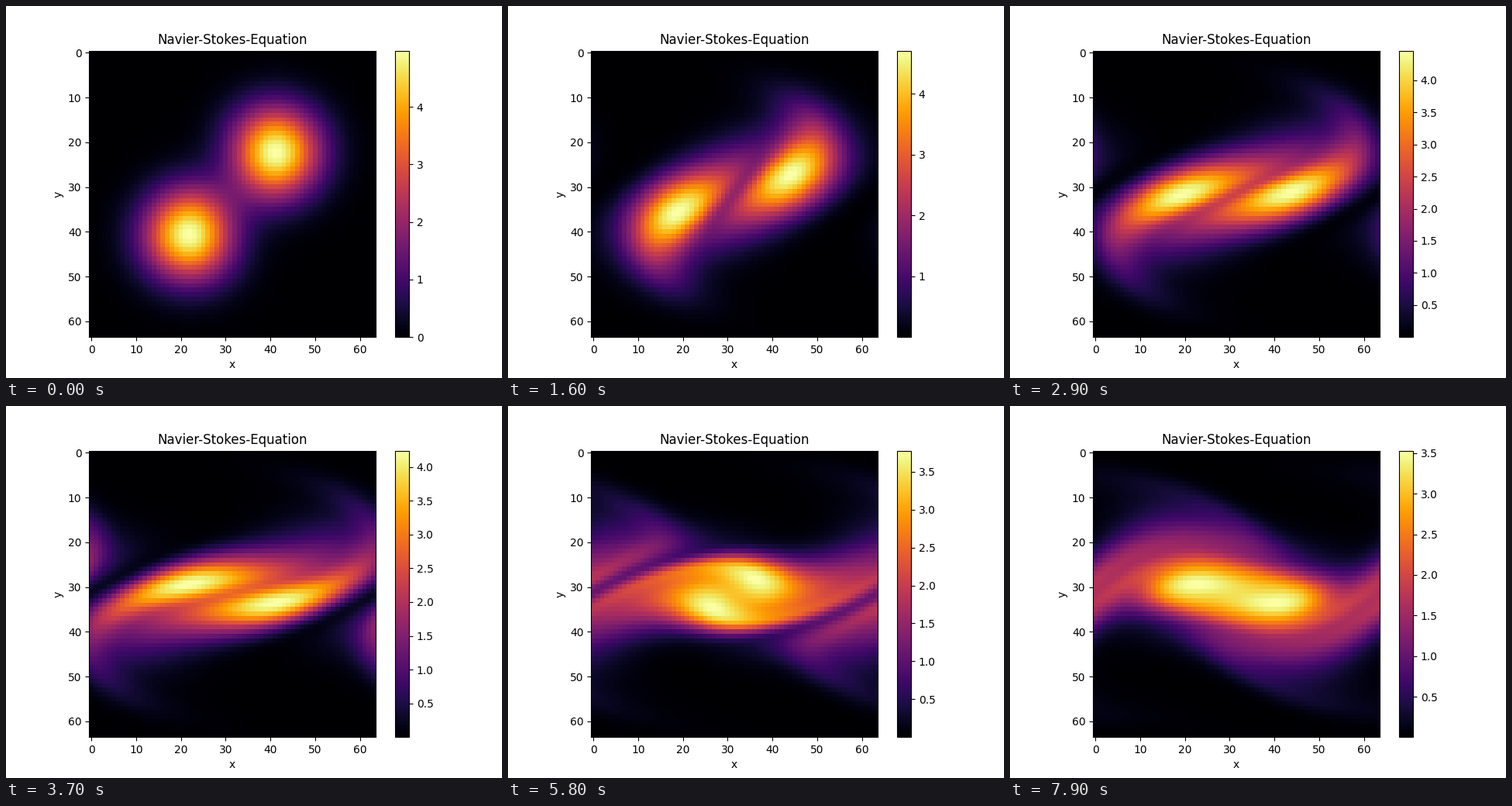
Animation of 640x480 px, one loop 8 s. Source, as a matplotlib script:

```python
import numpy as np
import matplotlib.pyplot as plt
from matplotlib.animation import FuncAnimation

N = 64            # grid points per side
NU = 0.001        # viscosity
FRAMES = 80
FRAME_DT = 0.08   # simulated time per frame
SUBSTEPS = 4

# Wave numbers of a periodic square with side 2
k = np.pi * np.fft.fftfreq(N, 1 / N)
kx, ky = np.meshgrid(k, k)
k2 = kx**2 + ky**2
inv_k2 = 1 / np.where(k2 == 0, 1, k2)
inv_k2[0, 0] = 0


def to_grid(f):
    return np.fft.ifft2(f).real


def rate(w):
    """Time derivative of the vorticity spectrum."""
    psi = w * inv_k2
    u = to_grid(1j * ky * psi)
    v = to_grid(-1j * kx * psi)
    advection = u * to_grid(1j * kx * w) + v * to_grid(1j * ky * w)
    return -np.fft.fft2(advection) - NU * k2 * w


def rk4(w, dt):
    a = rate(w)
    b = rate(w + dt / 2 * a)
    c = rate(w + dt / 2 * b)
    d = rate(w + dt * c)
    return w + dt / 6 * (a + 2 * b + 2 * c + d)


def simulate():
    x, y = np.meshgrid(np.linspace(-1, 1, N), np.linspace(-1, 1, N))

    def vortex(cx, cy):
        return 5 * np.exp(-((x - cx)**2 + (y - cy)**2) / 0.1)

    w = np.fft.fft2(vortex(0.3, -0.3) + vortex(-0.3, 0.3))
    fields = []
    for _ in range(FRAMES):
        for _ in range(SUBSTEPS):
            w = rk4(w, FRAME_DT / SUBSTEPS)
        fields.append(to_grid(w))
    return fields


fields = simulate()

fig, ax = plt.subplots(figsize=(6.4, 4.8), dpi=100)
im = ax.imshow(fields[0], cmap="inferno", interpolation="nearest")
fig.colorbar(im, ax=ax)
ax.set_title("Navier-Stokes-Equation")
ax.set_xlabel("x")
ax.set_ylabel("y")


def update(n):
    w = fields[n]
    # The scale reaches zero only at the very start
    low = min(w.min(), 0) if n < 4 else max(w.min(), 1e-6)
    im.set_data(w)
    im.set_clim(low, w.max())
    return [im]


anim = FuncAnimation(fig, update, frames=FRAMES, interval=100,
                     init_func=lambda: update(0), repeat=True, repeat_delay=0)
plt.show()
```
